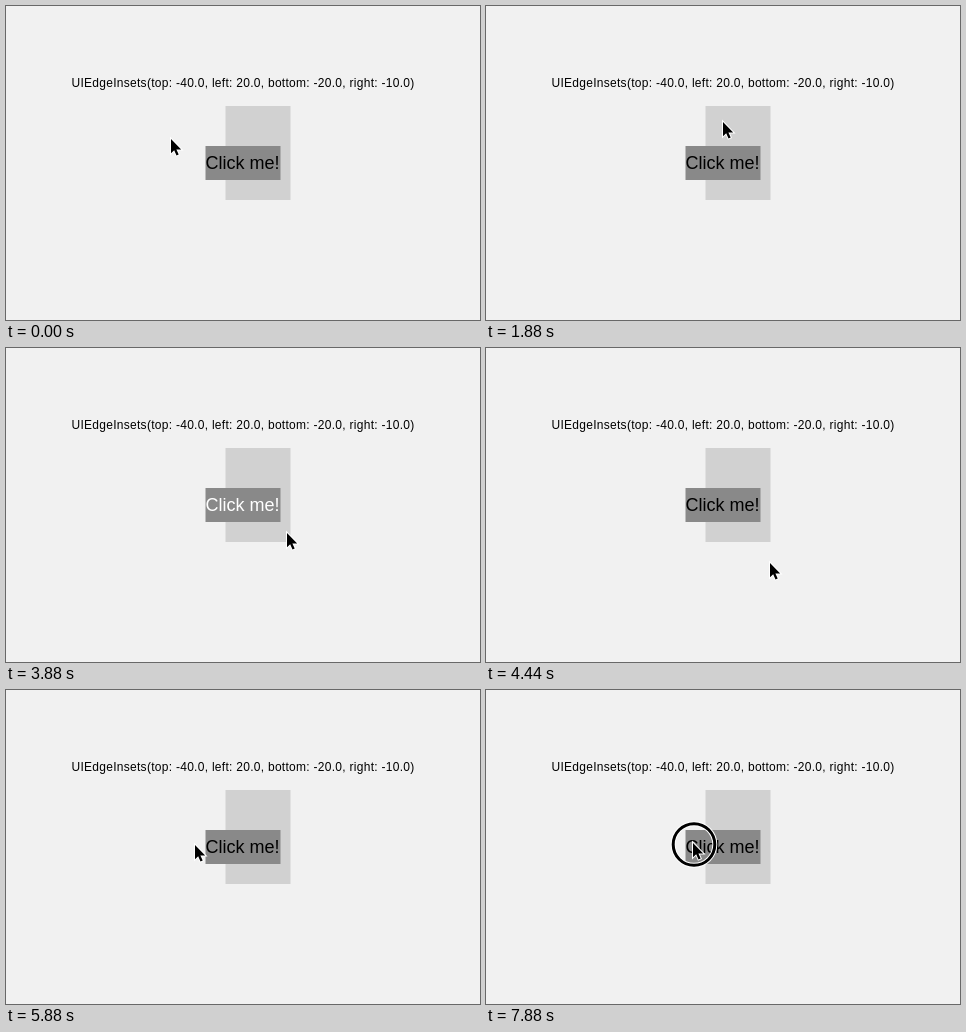
Animation, 474 px wide and 314 px high, one loop 8 s. Source, as an HTML page:

```html
<!DOCTYPE html>
<html lang="en">
<head>
<meta charset="utf-8">
<title>Button hit area</title>
<style>
  html, body { margin: 0; width: 100%; height: 100%; overflow: hidden; background: #f1f1f1; }
  svg { display: block; width: 474px; height: 314px; font-family: "Liberation Sans", Arial, sans-serif; }
</style>
</head>
<body>
<svg viewBox="0 0 474 314">
  <text x="65.5" y="81" font-size="12" letter-spacing=".28">UIEdgeInsets(top: -40.0, left: 20.0, bottom: -20.0, right: -10.0)</text>
  <rect x="219.5" y="100" width="65" height="94" fill="#d1d1d1"/>
  <rect x="199.5" y="140" width="75" height="34" fill="#898989"/>
  <text id="label" x="199.5" y="163" font-size="18">Click me!</text>
  <g id="pointer">
    <g id="ring" fill="none">
      <circle cx="1" cy="1.5" r="20.8" stroke="#fff" stroke-width="5"/>
      <circle cx="1" cy="1.5" r="20.8" stroke="#000" stroke-width="3"/>
    </g>
    <path d="M0 0V14.2L3.2 11.2 5.5 16.5 7.7 15.5 5.4 10.4H10.2Z" stroke="#fff" stroke-width="2" paint-order="stroke"/>
  </g>
</svg>
<script>
  const LOOP = 8000, STEP = 40, PRESS = 160;

  // Pointer moves: start ms, end ms, x, y
  const start = [165, 133];
  const moves = [
    [0, 480, 234, 185],
    [840, 1240, 207, 153],
    [1520, 1840, 237, 116],
    [2200, 2440, 275, 132],
    [2560, 2680, 279, 133],
    [2960, 3400, 281, 187],
    [3600, 3680, 281, 185],
    [3880, 4200, 286, 217],
    [4400, 4720, 231, 182],
    [4960, 5280, 207, 153],
    [5680, 5880, 189, 155],
    [5920, 6000, 187, 155],
    [6160, 6360, 207, 153],
    [6560, 6800, 181, 154],
    [7000, 7200, 212, 155],
    [7360, 7560, 211, 128],
    [7600, 7840, 207, 153]
  ];

  // Clicks: time and whether the pointer is inside the touch area
  const clicks = [
    [560, true], [1320, false], [1960, true], [2720, true], [3680, true], [4240, false],
    [4760, true], [5520, false], [6000, false], [6400, false], [6840, false], [7200, false], [7880, false]
  ];

  const label = document.getElementById("label");
  const pointer = document.getElementById("pointer");
  const ring = document.getElementById("ring");
  const ease = p => p * p * (3 - 2 * p);

  function position(t) {
    let [x, y] = start;
    for (const [from, to, nextX, nextY] of moves) {
      if (t <= from) break;
      const p = ease(Math.min(1, (t - from) / (to - from)));
      x += (nextX - x) * p;
      y += (nextY - y) * p;
    }
    return [Math.round(x), Math.round(y)];
  }

  function draw(now) {
    const t = Math.floor((now % LOOP) / STEP) * STEP;
    const pressed = clicks.some(([at]) => t >= at && t < at + PRESS);
    // The highlight trails the press slightly
    const lit = clicks.some(([at, inside]) => inside && t >= at + 40 && t < at + PRESS + 80);
    pointer.setAttribute("transform", `translate(${position(t)})`);
    ring.setAttribute("visibility", pressed ? "visible" : "hidden");
    label.setAttribute("fill", lit ? "#fff" : "#000");
  }

  const origin = performance.now();
  function tick() {
    draw(performance.now() - origin);
    requestAnimationFrame(tick);
  }
  tick();
</script>
</body>
</html>
```
